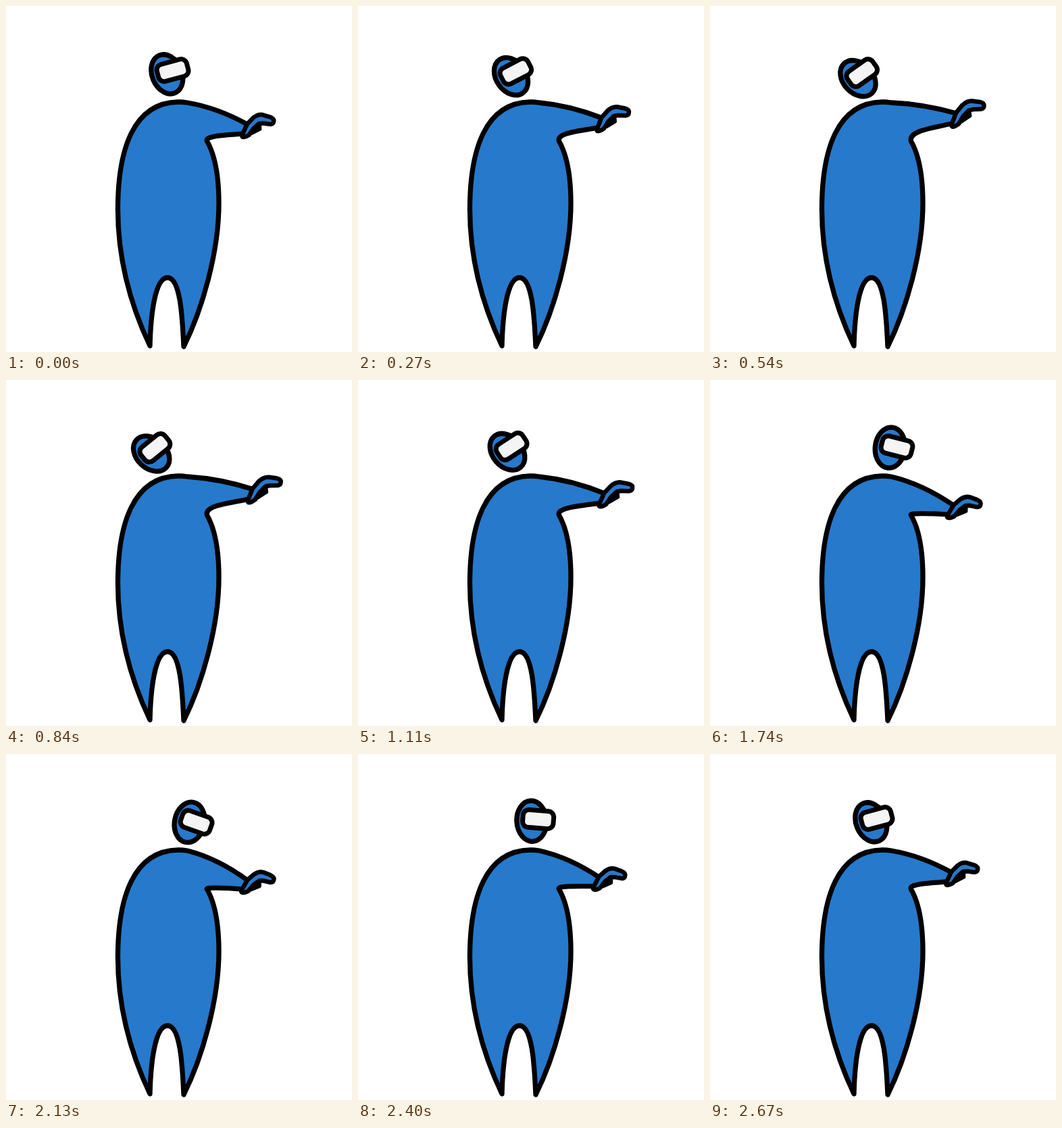
Write an HTML page that moves like this. It is 512x512 px and loops after 2700 ms.

```html
<!DOCTYPE html>
<html lang="en">
<head>
<meta charset="utf-8">
<title>Headset figure</title>
<style>
  html, body { margin: 0; width: 100%; height: 100%; overflow: hidden; background: #fff; }
  svg { display: block; width: 100vw; height: 100vh; }
  path, ellipse, rect {
    fill: #2779cb; stroke: #000; stroke-width: 7.3;
    stroke-linejoin: round; stroke-linecap: round;
    vector-effect: non-scaling-stroke;
  }
  #visor { fill: #f5f4f5; stroke-width: 7; }
  #hand path { stroke-width: 6.5; }
  #hand #thumb { fill: #000; stroke-width: 4; }
</style>
</head>
<body>
<svg viewBox="0 0 512 512">
  <path id="body"/>
  <g id="hand">
    <path id="thumb" d="M10 0 L31 -1 L29 3.5 L14 4 Z"/>
    <path d="M-1 0 L14 -12 L27 -16.5 Q36 -18.5 42 -14.5 L51 -7
             Q56 -2 53 1.5 Q51 4.5 47 3 L37 -3 L31 -5 L20 -2 L9 4 Q-3 5 -1 0 Z"/>
  </g>
  <g id="head">
    <ellipse rx="22.1" ry="30.1" transform="rotate(-8)"/>
    <rect id="visor" x="-13.3" y="-16.4" width="45.5" height="26" rx="8.5"/>
  </g>
</svg>
<script>
const LOOP = 2700, STEP = 30, CYCLE = 2670, HAND = 52.85;

// one value per beat, five equal beats in a cycle
const tilt = [-15, -35, -35, 8, 19.5];
const wristX = [350, 358, 357.5, 353, 349];
const wristY = [191, 176, 183.5, 199, 202];

const $ = id => document.getElementById(id);
const body = $('body'), hand = $('hand'), head = $('head');

// smooth closed curve through the beats, phase from 0 to 1
function glide(beats, phase) {
  const n = beats.length, i = Math.floor(phase * n), u = phase * n - i;
  const [a, b, c, d] = [-1, 0, 1, 2].map(j => beats[(i + j + n) % n]);
  return b + u / 2 * (c - a + u * (2 * a - 5 * b + 4 * c - d + u * (3 * (b - c) + d - a)));
}

function draw(t) {
  const phase = t / CYCLE % 1;

  // the head swings around the neck
  const angle = glide(tilt, phase);
  const hx = 252.7 + 0.96 * angle, hy = 99.2 + 0.0058 * (angle - 2) ** 2;
  head.setAttribute('transform', `translate(${hx} ${hy}) rotate(${angle})`);

  // the hand turns up as it rises and grows as it reaches out
  const bx = glide(wristX, phase), by = glide(wristY, phase), drop = by - 191;
  const turn = (0.47 * drop - 25) * Math.PI / 180;
  const ux = Math.cos(turn), uy = Math.sin(turn);
  const k = (50 + 0.6 * (bx - 350)) / HAND;
  hand.setAttribute('transform', `matrix(${ux * k} ${uy * k} ${-uy} ${ux} ${bx} ${by})`);

  const at = (x, y) => [bx + ux * k * x - uy * y, by + uy * k * x + ux * y];
  const [wx, wy] = at(15, -10), [vx, vy] = at(3, -1);
  const cx = (268 + wx) / 2, cy = (143 + wy) / 2 - 3 - 0.18 * (wy - 143);

  body.setAttribute('d', `M213 503 C195 465 165 390 165.5 298 C166 215 187 143 255 142
    Q262 142 268 143 Q${cx} ${cy} ${wx} ${wy} L${vx} ${vy}
    C324 ${191 + 0.64 * drop} 294 ${192 + 0.45 * drop} 297.5 200
    C310 222 315 255 315 292 C315 365 290 450 263 504
    C261 460 258 402 239 402 C220 402 214 460 213 503 Z`);
}

function tick() {
  const t = performance.now() % LOOP;
  draw(Math.floor(t / STEP) * STEP);
  requestAnimationFrame(tick);
}
tick();
</script>
</body>
</html>
```
